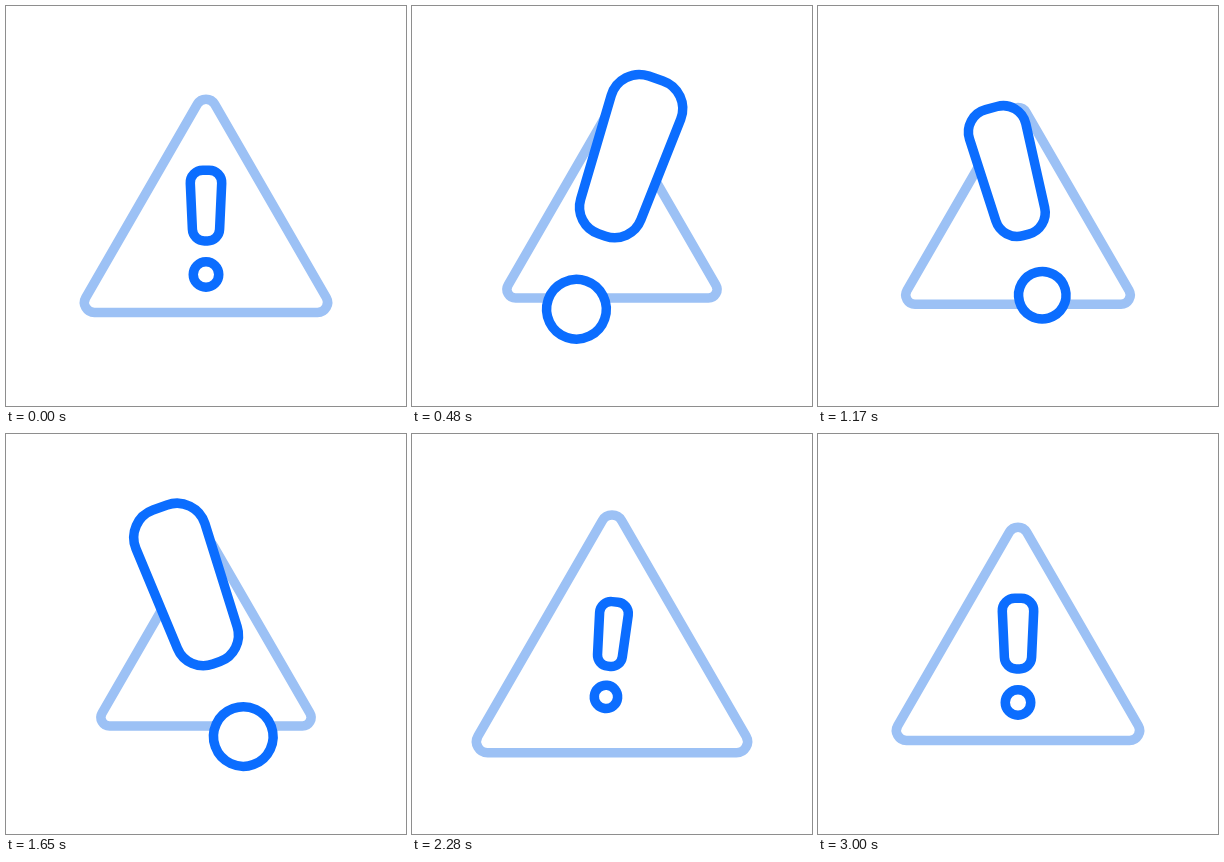
Animation, 400 px wide and 400 px high, one loop 3.03 s. Source, as an HTML page:

```html
<!DOCTYPE html>
<html lang="en">
<head>
<meta charset="utf-8">
<title>Warning icon</title>
<style>
  html, body { margin: 0; width: 100%; height: 100%; overflow: hidden; background: #fff; }
  svg { display: block; width: 100vw; height: 100vh; }
  #triangle { fill: none; stroke: #9cc1f5; }
  #mark { fill: #fff; stroke: #0b6dff; stroke-linejoin: round; }
</style>
</head>
<body>
<svg viewBox="-200 -200 400 400">
  <path id="triangle" d="M-8.66-101.8A10 10 0 0 1 8.66-101.8L120.25 91.5A10 10 0 0 1 111.6 106.5H-111.6A10 10 0 0 1-120.25 91.5Z"/>
  <g id="mark">
    <path d="M-3.2-58.3H3.2A12.5 12.5 0 0 1 15.7-45.3L13.6 .9A12 12 0 0 1 1.6 12.4H-1.6A12 12 0 0 1-13.6 .9L-15.7-45.3A12.5 12.5 0 0 1-3.2-58.3Z"/>
    <circle cy="46" r="12.75"/>
  </g>
</svg>
<script>
const LOOP = 3030, STEP = 30, STROKE = 9.5;
const triangle = document.getElementById('triangle');
const mark = document.getElementById('mark');

const rest = { frame: 1, size: 1, drop: 22.5, tilt: 0 };
const lean = tilt => ({ frame: .864, size: 2.34, drop: 1.6, tilt });

// A pose may leave out a property that just passes through.
const poses = [
  { at: 0, ...rest },
  { at: 490, ...lean(19) },
  { at: 920, frame: .944, size: 1.38, drop: 12.2 },
  { at: 1635, ...lean(-20) },
  { at: 2220, frame: 1.118, size: .91, drop: 21, tilt: 5.6 },
  { at: 2750, ...rest }
];

// Easing handles of each property
const handles = { frame: [.4, .6], size: [.3, .3], drop: [.3, .3], tilt: [.5, .15] };

// cubic-bezier(x1, 0, x2, 1), solved by bisection
function ease(x, [x1, x2]) {
  let lo = 0, hi = 1, p = .5;
  for (let i = 0; i < 24; i++) {
    p = (lo + hi) / 2;
    const q = 1 - p;
    if (3 * q * q * p * x1 + 3 * q * p * p * x2 + p ** 3 < x) lo = p; else hi = p;
  }
  return p * p * (3 - 2 * p);
}

function valueAt(name, t) {
  const keys = poses.filter(pose => name in pose);
  const next = keys.findIndex(pose => pose.at > t);
  if (next < 0) return rest[name];
  const a = keys[next - 1], b = keys[next];
  return a[name] + (b[name] - a[name]) * ease((t - a.at) / (b.at - a.at), handles[name]);
}

// Scales the shape but keeps its line weight.
function place(el, scale, move = '') {
  el.setAttribute('transform', `${move} scale(${scale})`);
  el.setAttribute('stroke-width', STROKE / scale);
}

function draw(now) {
  const t = Math.floor((now % LOOP) / STEP) * STEP;
  const at = name => valueAt(name, t);
  place(triangle, at('frame'));
  place(mark, at('size'), `rotate(${at('tilt')}) translate(0 ${at('drop')})`);
}

let start;
function tick(now) {
  start ??= now;
  draw(Math.max(0, now - start));
  requestAnimationFrame(tick);
}
draw(0);
requestAnimationFrame(tick);
</script>
</body>
</html>
```
